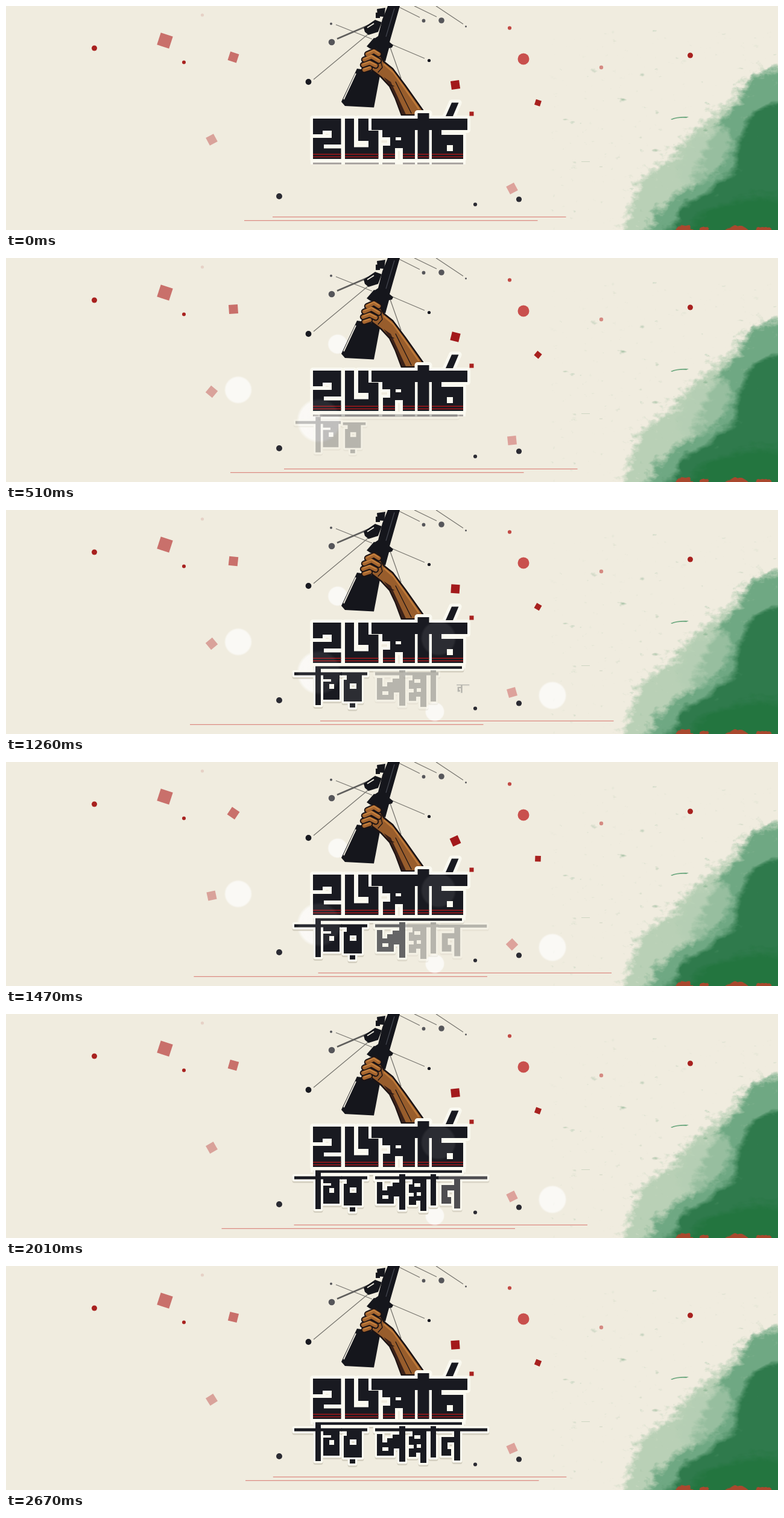
Animation, 1280 px wide and 372 px high, one loop 2.7 s. Source, as an HTML page:

```html
<!DOCTYPE html>
<html lang="bn">
<head>
<meta charset="utf-8">
<title>২৬ মার্চ চির অম্লান</title>
<style>
  html, body { margin: 0; width: 100%; height: 100%; overflow: hidden; background: #f0ecdf; }
  svg { position: absolute; left: 0; top: 0; width: 1280px; height: 372px; }
  #brush { will-change: transform; }
</style>
</head>
<body>
<svg id="brush" viewBox="0 0 1280 372"></svg>
<svg id="scene" viewBox="0 0 1280 372" role="img" aria-label="২৬ মার্চ চির অম্লান"></svg>
<script>
const LOOP = 2700, STEP = 30;
const INK = '#191a21', PAPER = '#fbfaf1', RED = '#a3191b';
const $ = id => document.getElementById(id);
const clamp = v => Math.max(0, Math.min(1, v));
const ramp = (t, from, to) => clamp((t - from) / (to - from));
const smooth = p => p * p * (3 - 2 * p);

// Ragged paint: a blurred shape plus noise, thresholded and flooded with one colour.
const roughFilter = (id, color, blur, slope, seed, freq) => `
  <filter id="${id}" filterUnits="userSpaceOnUse" x="900" y="40" width="440" height="400" color-interpolation-filters="sRGB">
    <feTurbulence type="fractalNoise" baseFrequency="${freq}" numOctaves="4" seed="${seed}" result="noise"/>
    <feGaussianBlur in="SourceAlpha" stdDeviation="${blur}" result="soft"/>
    <feComposite in="soft" in2="noise" operator="arithmetic" k2="1" k3=".9" k4="-.45"/>
    <feComponentTransfer result="mask"><feFuncA type="linear" slope="${slope}" intercept="${.5 - slope / 2}"/></feComponentTransfer>
    <feFlood flood-color="${color}"/>
    <feComposite in2="mask" operator="in"/>
  </filter>`;

$('brush').innerHTML = `<defs>
  ${roughFilter('pale', '#b9d0b6', 14, 2.2, 3, '.07 .1')}
  ${roughFilter('mid', '#6fa883', 10, 2, 8, '.06 .09')}
  ${roughFilter('mist', '#b3ceb3', 8, 2, 21, '.06 .08')}
  ${roughFilter('deep', '#2f7a4c', 9, 2.2, 5, '.03 .05')}
  ${roughFilter('rich', '#23753f', 10, 2.2, 11, '.03 .06')}
  ${roughFilter('rust', '#a9482e', 2, 5, 14, '.12 .16')}
  </defs>
  <path filter="url(#pale)" d="M1340 92L1246 112L1215 136L1207 162L1167 178L1150 207L1124 218L1110 248L1080 264L1046 292L1038 324L1008 420H1340Z"/>
  <path filter="url(#mid)" d="M1340 90L1250 112L1222 136L1216 164L1190 184L1172 214L1152 250L1142 290L1108 320L1075 345L1045 420H1340Z"/>
  <path filter="url(#mist)" d="M1140 216L1188 196L1206 224L1190 262L1160 290L1120 304L1112 260Z" opacity=".6"/>
  <path filter="url(#deep)" d="M1340 150L1262 165L1230 186L1222 216L1206 240L1214 268L1192 290L1158 312L1118 334L1075 420H1340Z"/>
  <path filter="url(#rich)" d="M1340 316L1240 318L1190 330L1145 350L1110 420H1340Z"/>
  <path filter="url(#rust)" d="M1108 376L1116 365H1134L1140 376ZM1150 367H1166V376H1150ZM1186 376L1206 365H1222L1232 376ZM1244 367H1268V376H1244Z"/>
  <path d="M1102 188Q1114 183 1132 184L1128 186Q1114 185 1104 189Z" fill="#6fa981"/>
  <path d="M954 258.5h14M984 267h5" stroke="#cdd5c2"/>`;

const dots = [
  [146.5, 70, 4.5, '#a8211f'], [295, 93.5, 3, '#a8211f'], [325.5, 15, 2.6, '#e6d1c6'],
  [835, 36.5, 3.1, '#c24a45'], [858, 88, 9.5, '#c9504d'], [987, 102, 3.2, '#d58a82'],
  [1134.5, 82, 4.5, '#a8211f'], [453, 316, 5, '#2b2b33'], [778, 329.5, 3.1, '#2b2b33'],
  [850.5, 321, 4.6, '#2b2b33'], [540, 60, 5.3, '#56565a'], [539, 29.5, 2, '#56565a'],
  [501.5, 126, 4.9, INK], [722, 24, 4.8, '#56565a'], [692.5, 24.5, 2.9, '#56565a'],
  [701.5, 90.5, 2.6, INK], [762.5, 34, 1.5, '#56565a']
].map(([x, y, r, c]) => `<circle cx="${x}" cy="${y}" r="${r}" fill="${c}"/>`).join('');

// x, y, side, colour, start angle, turns per loop
const squares = [
  [263.5, 57.5, 21, '#c9706b', 18, 0], [772, 179, 7, '#a8211f', 0, 0],
  [377, 85, 15, '#c9706b', 18, 1], [745, 131, 14.3, RED, -8, -1],
  [882, 160.7, 9.5, '#a8211f', 18, -1], [341, 222, 14.5, '#d9a29a', -28, 1],
  [839, 303, 14.5, '#dda29b', -28, -1]
];

// x, y, radius, group, strength on top of the lettering
const glows = [
  [550, 143, 17, 0, 0], [385, 219, 23.5, 0, 0], [519, 270, 37.5, 0, .07],
  [717, 213, 30, 1, .08], [906, 308, 24, 1, 0], [711, 335, 16.5, 1, 0]
];
const glowLife = t => [
  ramp(t, 60, 400) * (1 - ramp(t, 1480, 1980)),
  ramp(t, 540, 860) * (1 - ramp(t, 2180, 2600))
];

const title = [
  'M509 187H555.5V230H527V236.5H555.5V254H509V219H540V207H525V213H509Z',
  'M562 187H577V234.5H601V224H584V187H601V207H617.5V254H562Z',
  'M606 187H765V206H722V214H758V254H706V206H701.5V254H682.5V206H678V254H658V236H645V254H625V232H637V218H624V206H606Z',
  'M646 218V223H655V218ZM731 231V241H741V231Z',
  'M682.5 178H701.5V190H682.5Z'
].join('');
const reph = 'M729 183L739 160.5H750.5L741 183Z';
const shadowBars = [[509, 556], [562, 618], [624, 645], [658, 678], [682, 702], [706, 758]]
  .map(([a, b]) => `<path d="M${a} 261.5H${b}"/>`).join('');

// path, centre, pop start and end, ink start and end
const glyphs = [
  { d: 'M513 259.5H756V263.8H513Z', c: [634.5, 261.5], pop: [120, 580], ink: [600, 990] },
  { d: 'M478 269.5H557V274.5H553V315H526V285H539V281H526V274.5H522V324H513V274.5H478ZM536 289V297H544V289ZM513 262H522V270H513Z',
    c: [518, 297], pop: [120, 570], ink: [600, 1010] },
  { d: 'M556 269.5H599V274.5H590V318H560V282H565V274.5H556ZM570 288V297H581V288ZM570 321H579V328H570Z',
    c: [577, 298], pop: [160, 610], ink: [900, 1310] },
  { d: 'M612 269.5H652V266H662V325H652V303H643V315H615V279H624V293H632V286H641V280H652V274.5H612ZM624 301V307H634V301Z',
    c: [637.5, 297], pop: [540, 990], ink: [1280, 1640] },
  { d: 'M662 269.5H704V266H713V269.5H717V274.5H713V318H704V274.5H697V327H687V310H680V317H668V303H676V297H668V283H674V274.5H662ZM677 281V287H687V281ZM681 296V302H688V296Z',
    c: [691, 298], pop: [860, 1250], ink: [1500, 1900] },
  { d: 'M716 269.5H798V274.5H753V323H743V293H732V304H738V315H722V284H743V274.5H716Z',
    c: [758, 297], pop: [1140, 1500], ink: [1720, 2150] }
];

const fingers = 'M599 80L610 75L618 80M594 89L606 84L618 91M592 98L603 94L613 99M594 106L603 103';
const art = `
  <g stroke="#77756f" stroke-width="1.3" fill="none">
    <path d="M510 122L600 47M547 31L607 55M652 2L686 19M677 0L714 18M713 0L758 30M640 64L694 87M636 66L655 120"/>
    <path d="M549 54.5L606 30" stroke-width="2.7" stroke="#605f5d"/>
  </g>
  <g fill="#15161c">
    <path d="M633 0H653L636 60L642 65L640 69L635 70L629 92L612 86L616 68L611 54L617 50L624 22Z"/>
    <path d="M615 5L629 3L627 18L616 17ZM613 11H620V20H613ZM593 36L612 23L623 27L617 43L601 48L595 43Z"/>
    <path d="M598 67L610 53L620 56L616 72L604 71Z"/>
    <path d="M582 104L556 159L562 166L610 168.5L621 110Z"/>
  </g>
  <path d="M644 4L630 51" stroke="#454851" stroke-width="1.2"/>
  <path d="M580 112L560 155M599 36L610 29" stroke="#f3efe3" stroke-width="1.8"/>
  <g stroke="#1b1314" stroke-linejoin="round" stroke-linecap="round" fill="none">
    <path d="M606 76L618 77L626 92L641 104L662 132L691 173V181H656L646 154L636 133L622 118L606 106Z" fill="#985d2c" stroke-width="2.6"/>
    <path d="M626 118L638 126L663 180H657L639 136Z" fill="#3a2119" stroke="none"/>
    <path d="M627 97L642 110L662 138L684 170" stroke="#c07b39" stroke-width="2.4"/>
    <path d="M646 126L672 178M636 131L643 133M622 94L624 102L617 110"  stroke-width="1.3"/>
    <path d="${fingers}" stroke-width="10.5"/>
    <path d="${fingers}" stroke="#a5652f" stroke-width="6.5"/>
    <path d="${fingers}" stroke="#c98540" stroke-width="1.6" transform="translate(0 -1.5)"/>
  </g>`;

const circles = layer => glows.map(([x, y, r], i) =>
  `<circle id="${layer}${i}" cx="${x}" cy="${y}" r="${r}" fill="url(#glow)"/>`).join('');
const outlined = (d, color, dy) =>
  `<path d="${d}" transform="translate(0 ${dy})" fill="${color}" stroke="${color}" stroke-width="7" stroke-linejoin="round"/>`;
const edges = glyphs.map(({ d }, i) =>
  `<g id="edge${i}">${outlined(d, '#d3cebf', 2.5)}${outlined(d, PAPER, 0)}</g>`).join('');
const inks = glyphs.map(({ d }, i) => `<path id="ink${i}" d="${d}" fill="${INK}"/>`).join('');

$('scene').innerHTML = `<defs>
    <radialGradient id="glow"><stop offset=".86" stop-color="#fff"/><stop offset="1" stop-color="#fff" stop-opacity="0"/></radialGradient>
    <clipPath id="letters"><path d="${title}"/></clipPath>
  </defs>
  ${dots}
  ${squares.map(([, , s, c], i) => `<rect id="sq${i}" x="${-s / 2}" y="${-s / 2}" width="${s}" height="${s}" fill="${c}"/>`).join('')}
  <g stroke="#dc8a82" stroke-width="1.2"><path id="upper" d="M0 350.3h486.5"/><path id="lower" d="M0 356.3h486.5"/></g>
  ${circles('under')}
  ${art}
  <path d="${title}${reph}" fill="${PAPER}" stroke="${PAPER}" stroke-width="10" stroke-linejoin="round"/>
  <path d="M505 255H762V263H505Z" fill="${PAPER}"/>
  <g stroke="#aaa5a2" stroke-width="3">${shadowBars}</g>
  ${edges}
  <path d="${title}${reph}" fill="${INK}"/>
  <path clip-path="url(#letters)" d="M505 246.2H762M505 250.4H762" stroke="#a5181b" stroke-width="1.5"/>
  ${inks}
  ${circles('over')}`;

const track = (keys, t) => {
  const i = Math.max(1, keys.findIndex(k => k[0] >= t));
  const [t0, a] = keys[i - 1], [t1, b] = keys[i];
  return a + (b - a) * ramp(t, t0, t1);
};
const upperKeys = [[0, 442], [255, 447], [510, 461], [930, 493], [1260, 521], [1335, 528], [1710, 499], [2310, 456], [2490, 447.5], [2700, 442]];
const lowerKeys = [[0, 395], [255, 387], [510, 372], [930, 337], [1260, 305], [1325, 299], [1710, 332], [2310, 383], [2490, 393], [2670, 397], [2700, 395]];

function draw(t) {
  squares.forEach(([x, y, , , angle, turns], i) =>
    $('sq' + i).setAttribute('transform', `translate(${x} ${y}) rotate(${angle + turns * 360 * t / LOOP})`));
  $('upper').setAttribute('transform', `translate(${track(upperKeys, t)} 0)`);
  $('lower').setAttribute('transform', `translate(${track(lowerKeys, t)} 0)`);

  const life = glowLife(t);
  glows.forEach(([, , , group, strength], i) => {
    $('under' + i).setAttribute('opacity', .68 * life[group]);
    $('over' + i).setAttribute('opacity', strength * life[group]);
  });

  glyphs.forEach(({ c: [x, y], pop, ink }, i) => {
    const size = smooth(ramp(t, ...pop));
    const alpha = size ? .28 + .72 * ramp(t, ...ink) : 0;
    for (const layer of ['edge', 'ink']) {
      const node = $(layer + i);
      node.setAttribute('transform', `translate(${x} ${y}) scale(${size}) translate(${-x} ${-y})`);
      node.setAttribute('opacity', alpha);
    }
  });
}

const start = performance.now();
function tick() {
  const t = (performance.now() - start) % LOOP;
  draw(Math.floor(t / STEP) * STEP);
  requestAnimationFrame(tick);
}
tick();
</script>
</body>
</html>
```
